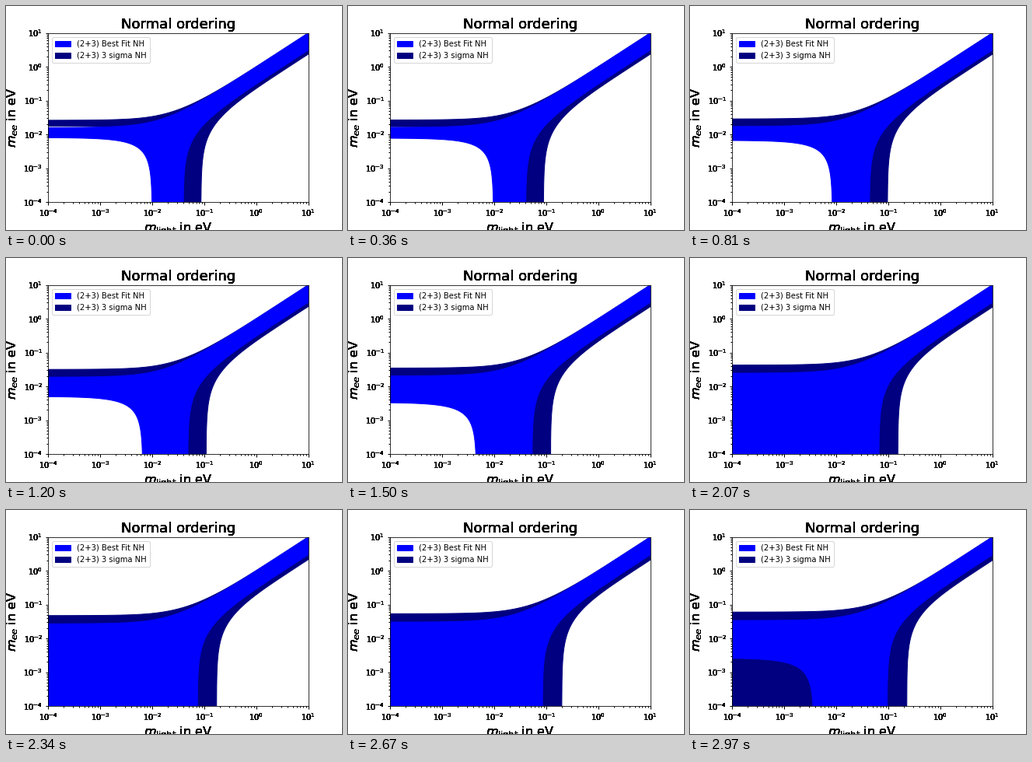
A matplotlib script that plays this animation: 432 by 288 pixels, repeating every 3 s.

```python
import numpy as np
import matplotlib.pyplot as plt
from matplotlib.animation import FuncAnimation

FRAMES = 100
DM21, DM31, DM41, DM51 = 7.5e-5, 2.5e-3, 0.9, 1.6  # eV^2
FLOOR = 1e-6

m_light = np.logspace(-4, 1, 1500)
masses = [np.sqrt(m_light**2 + d) for d in (0, DM21, DM31, DM41, DM51)]


def terms(s12, s13, s14, s15):
    """Contributions |U_ei|^2 m_i for squared sines of the mixing angles."""
    c = (1 - s14) * (1 - s15)
    weights = (
        (1 - s12) * (1 - s13) * c,
        s12 * (1 - s13) * c,
        s13 * c,
        s14 * (1 - s15),
        s15,
    )
    return [w * m for w, m in zip(weights, masses)]


def band(parts, dominant):
    """Upper and lower edge of m_ee; `dominant` lists terms that may win."""
    top = sum(parts)
    low = np.max([2 * parts[i] - top for i in dominant], axis=0)
    return np.maximum(low, FLOOR), top


def best_fit(p):
    return band(terms(0.32, 0.024, 0.0125, np.sin(0.120 * p) ** 2), (0, 3, 4))


def three_sigma(p):
    return band(terms(0.348, 0.030, 0.0229, np.sin(0.166 * p) ** 2), (0, 3))


def outline(low, top):
    x = np.concatenate([m_light, m_light[::-1]])
    return np.column_stack([x, np.concatenate([low, top[::-1]])])


def darken(artist, times=8):
    """Paint an artist repeatedly so its soft edges become solid."""
    draw = artist.draw

    def repeated(renderer):
        for _ in range(times):
            draw(renderer)

    artist.draw = repeated


fig = plt.figure(figsize=(6, 4), dpi=72, facecolor="white")
ax = fig.add_axes([0.125, 0.125, 0.775, 0.755])
ax.set(xscale="log", yscale="log", xlim=(1e-4, 10), ylim=(1e-4, 10))
ax.set_title("Normal ordering", fontsize=18)
ax.set_xlabel(r"$m_{\mathrm{light}}$ in eV", fontsize=16)
ax.set_ylabel(r"$m_{ee}$ in eV", fontsize=16)
ax.tick_params(which="both", width=1)

wide = ax.fill_between(m_light, *three_sigma(0), color="navy")
core = ax.fill_between(m_light, *best_fit(0), color="blue")
ax.legend([core, wide], ["(2+3) Best Fit NH", "(2+3) 3 sigma NH"],
          loc="upper left", fontsize=10)

darken(ax.title)
for axis in (ax.xaxis, ax.yaxis):
    darken(axis.label)
    for tick in axis.get_major_ticks():
        darken(tick.label1)


def update(i):
    p = i / (FRAMES - 1)
    wide.set_verts([outline(*three_sigma(p))])
    core.set_verts([outline(*best_fit(p))])
    return wide, core


anim = FuncAnimation(fig, update, frames=FRAMES, interval=30,
                     repeat=True, repeat_delay=0, blit=False)
plt.show()
```
